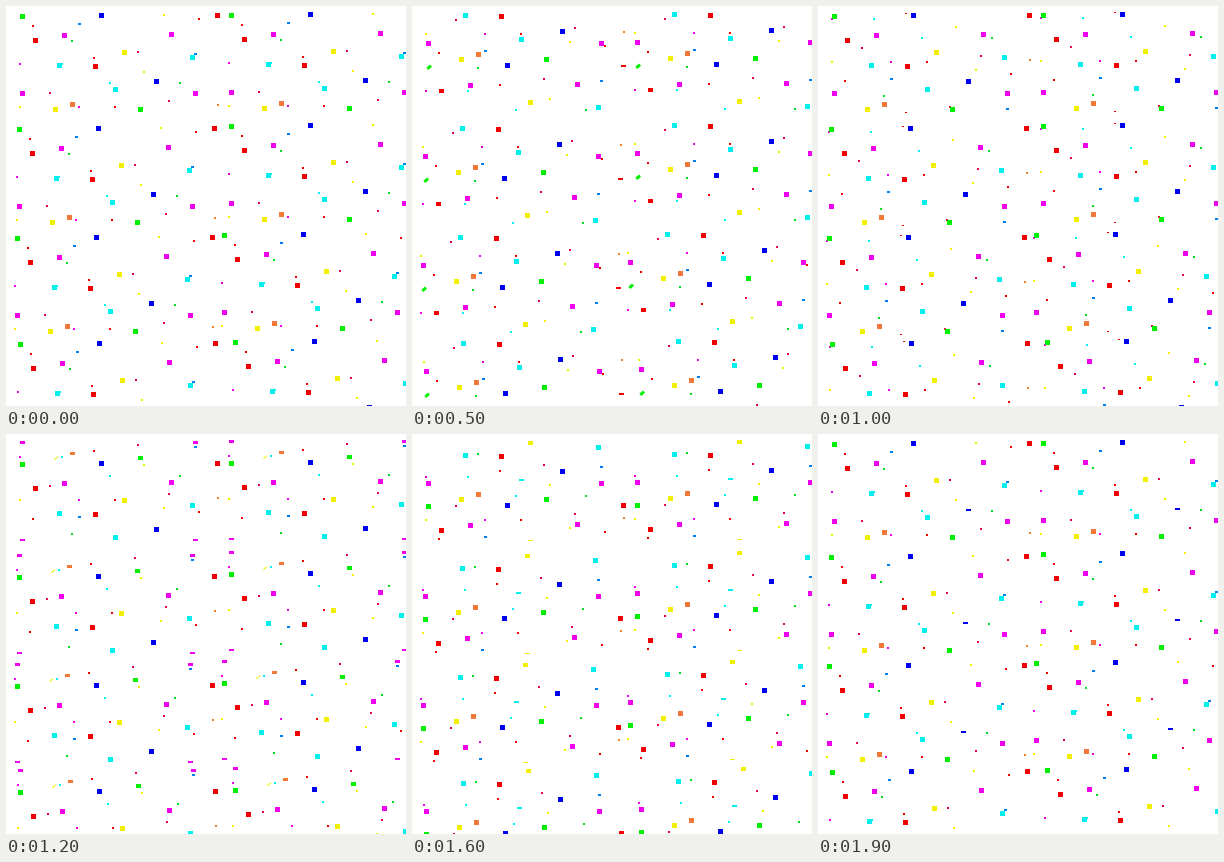
An HTML page with a canvas for the animation above (2 s loop, 400 px wide and 400 px high).

```html
<!DOCTYPE html>
<html lang="en">
<head>
<meta charset="utf-8">
<title>Falling confetti</title>
<style>
  html, body { margin: 0; width: 100%; height: 100%; overflow: hidden; background: #fff; }
  canvas { display: block; width: 400px; height: 400px; }
</style>
</head>
<body>
<canvas id="stage" width="400" height="400"></canvas>
<script>
const ctx = document.getElementById('stage').getContext('2d');
const STEP = 100, STEPS = 20, CYCLE = 10;
const TOP = 7, FALL = 100, SIZE = 5;
const FLAT = 0, NARROW = -90, DIAGONAL = -42;

const COLORS = {
  red: '#f00000', green: '#00f000', blue: '#0000f0', yellow: '#f0f000',
  cyan: '#00f0f0', magenta: '#f000f0', orange: '#f07838',
  crimson: '#e8003c', lime: '#00e020', sky: '#0080f0', amber: '#f08020'
};

// Where the patch of confetti is repeated.
const PATCHES = [[0, 0], [-3, 113], [-5, 222], [-2, 328],
                 [209, -1], [209, 110], [202, 219], [213, 326]];

// A flake is thinnest at one step of its cycle and opens on both sides of it.
const spin = (at, angle, thinnest = 1) => ({ at, angle, thinnest });

// Start of each flake: x, y, spins.
const FLAKES = {
  green: [[16, 10, spin(5, DIAGONAL, 3), spin(8, DIAGONAL, 3)], [134, 103, spin(3, FLAT)]],
  blue: [[95, 9], [150, 75, spin(9, FLAT, 2)]],
  red: [[29, 34, spin(5, FLAT, 4), spin(8, FLAT, 4)], [89, 60],
        [211, 9, spin(3, NARROW, 2), spin(5, FLAT, 2)]],
  magenta: [[58, 29, spin(3, FLAT, 4)], [165, 28], [189, 87], [16, 87, spin(8, NARROW, 2)]],
  yellow: [[118, 46], [49, 103, spin(2, DIAGONAL)]],
  cyan: [[53, 59], [186, 51], [109, 83, spin(7, FLAT, -1)]],
  orange: [[66, 98, spin(2, FLAT, 3)]]
};

// Start of each speck: x, y.
const SPECKS = {
  red: [[27, 20], [88, 52], [109, 101], [193, 13]],
  crimson: [[44, 87], [132, 46], [163, 95]],
  magenta: [[14, 58], [73, 101]],
  yellow: [[14, 101], [158, 9], [138, 66]],
  lime: [[66, 35], [174, 77]],
  cyan: [[104, 77], [56, 58]],
  sky: [[73, 18], [189, 48]],
  amber: [[212, 99]]
};

// Both falls cover whole heights and slightly change speed on the way.
const flakeDrop = k => Math.floor(k <= 5 ? k * 10 : 50 + (k - 5) * 12.5);
const speckDrop = k => Math.round(k <= 11 ? k * 60 / 11 : 60 + (k - 11) * 5);

const thickness = ({ at, thinnest }, k) =>
  Math.max(1, thinnest + 3 * Math.abs(k - at));

// Thin pieces lie one pixel off the centre.
function piece(x, y, w, h, angle = 0, dip = 0) {
  ctx.save();
  ctx.translate(x + 0.5, y + 0.5);
  ctx.rotate(angle * Math.PI / 180);
  ctx.fillRect(-Math.floor(w / 2) - 0.5, -Math.floor(h / 2) - 0.5 + dip, w, h);
  ctx.restore();
}

// Neighbouring copies let a piece leave below while it enters above.
function falling(x, y, ...shape) {
  const base = TOP + (y - TOP) % FALL;
  for (const shift of [-FALL, 0, FALL]) piece(x, base + shift, ...shape);
}

function eachPiece(group, paint) {
  for (const [color, pieces] of Object.entries(group)) {
    ctx.fillStyle = COLORS[color];
    for (const start of pieces) paint(color, ...start);
  }
}

function drawPatch([left, top], step) {
  const k = step % CYCLE;
  ctx.save();
  ctx.translate(left, top);
  ctx.beginPath();
  ctx.rect(0, TOP, 230, FALL);
  ctx.clip();
  eachPiece(SPECKS, (color, x, y) =>
    falling(x, y + speckDrop(step), color === 'sky' ? 3 : 2, 2));
  eachPiece(FLAKES, (color, x, y, ...spins) => {
    const turning = spins.find(s => thickness(s, k) < SIZE);
    const shape = turning
      ? [SIZE, thickness(turning, k), turning.angle, 1]
      : [SIZE, SIZE];
    falling(x, y + flakeDrop(k), ...shape);
  });
  ctx.restore();
}

function draw() {
  const step = Math.floor(performance.now() / STEP) % STEPS;
  ctx.fillStyle = '#fff';
  ctx.fillRect(0, 0, 400, 400);
  for (const patch of PATCHES) drawPatch(patch, step);
  requestAnimationFrame(draw);
}
draw();
</script>
</body>
</html>
```
